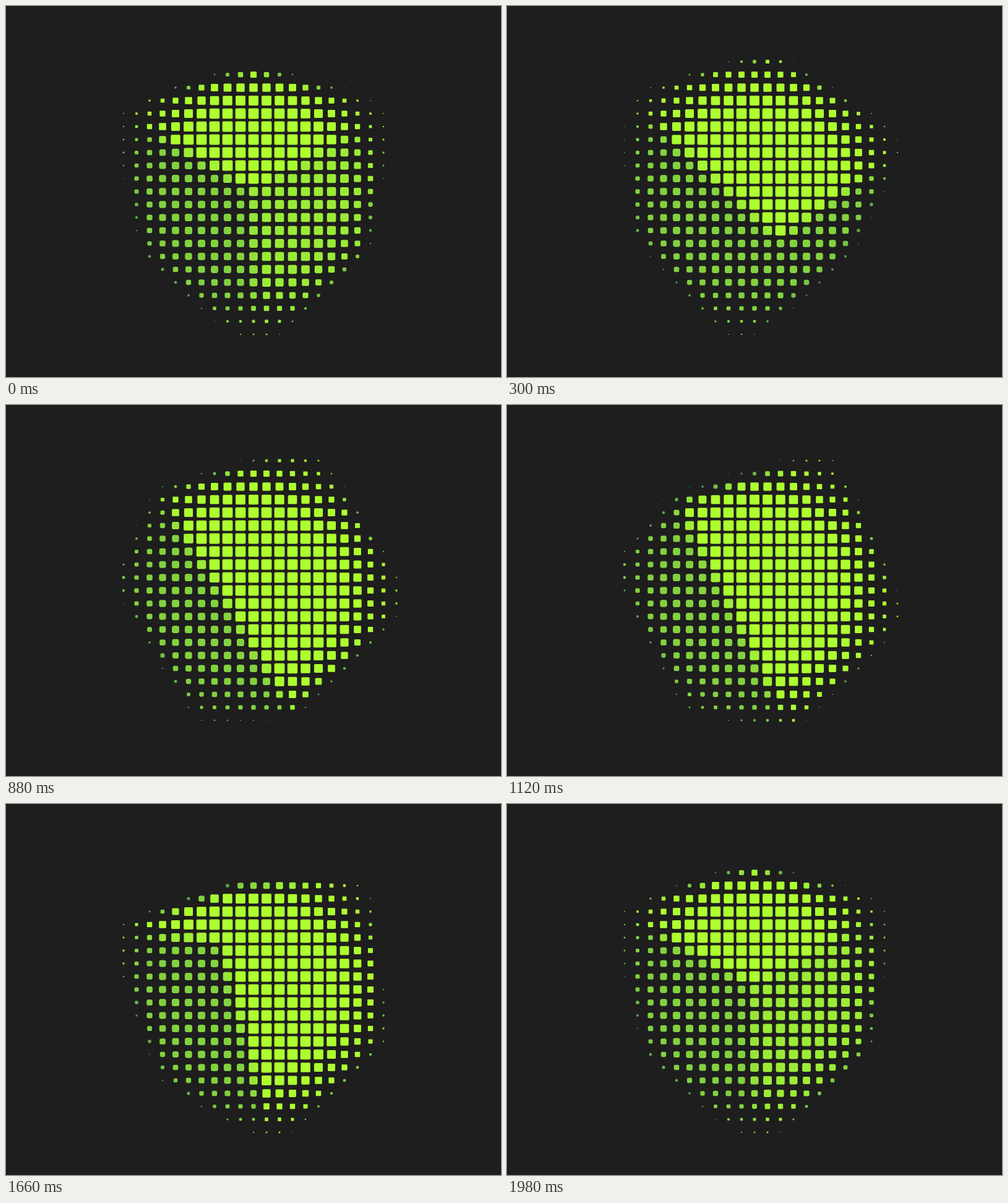
These frames come from a looping animation (800x600 px, 2 s). An HTML page with a canvas:

```html
<!DOCTYPE html>
<html lang="en">
<head>
<meta charset="utf-8">
<title>Halftone cube</title>
<style>
  html, body { margin: 0; width: 100%; height: 100%; overflow: hidden; background: #1e1e1e; }
  canvas { display: block; }
</style>
</head>
<body>
<canvas id="stage" width="800" height="600"></canvas>
<script>
const ctx = document.getElementById('stage').getContext('2d');
const LOOP = 2000, STEP = 20, COUNT = LOOP / STEP;
const PITCH = 21, DOT = 16.8, REACH = 247, IDLE_REACH = 232;
const CX = 400, CY = 300, FOCAL = 590, CAMERA = 4.24;
const FADE = Math.exp(-STEP / 60);
const SAMPLES = [-0.4, -0.2, 0, 0.2, 0.4];
const DARK = [20, 90, 106], LIME = [173, 255, 47];

const clamp = (v, a, b) => Math.min(b, Math.max(a, v));
const rad = deg => deg * Math.PI / 180;

// Dots shrink towards the rim.
function falloff(d) {
  const u = clamp((d - 128) / 142, 0, 1);
  return 1 - u * u * (3 - 2 * u);
}

const cells = [];
for (let j = -11; j <= 11; j++) {
  for (let i = -11; i <= 11; i++) {
    const d = Math.hypot(i, j) * PITCH;
    if (d < REACH) cells.push({ x: CX + i * PITCH, y: CY + j * PITCH, d, scale: falloff(d) });
  }
}

// Isometric view of a cube with half side 1, seen in perspective.
function project(deg, z) {
  const x = Math.SQRT2 * Math.cos(rad(deg)), y = Math.SQRT2 * Math.sin(rad(deg));
  const k = FOCAL / (CAMERA - (x + y + z) / Math.sqrt(3));
  return [
    CX + k * (x - z) / Math.SQRT2,
    CY - k * (2 * y - x - z) / Math.sqrt(6)
  ];
}

function turn(ms) {
  const p = 2 * Math.PI * ms / LOOP;
  return 90 * ms / LOOP + 1.7 * (1 - Math.cos(p)) + 1.5 * Math.sin(p);
}

function area(q) {
  return q.reduce((sum, p, i) => {
    const n = q[(i + 1) % q.length];
    return sum + p[0] * n[1] - n[0] * p[1];
  }, 0);
}

function visibleFaces(ms) {
  const a = turn(ms);
  const faces = [{ light: 0.52, quad: [45, 135, 225, 315].map(v => project(v - a, 1)) }];
  for (let k = -1; k <= 2; k++) {
    const phase = a + 90 * k, n = 90 - phase;
    faces.push({
      light: clamp(1 - (phase - 76) * 0.02, 0.52, 1),
      quad: [project(n - 45, 1), project(n - 45, -1), project(n + 45, -1), project(n + 45, 1)]
    });
  }
  return faces.filter(f => area(f.quad) < 0);
}

function inside(q, x, y) {
  for (let i = 0; i < 4; i++) {
    const a = q[i], b = q[(i + 1) % 4];
    if ((b[0] - a[0]) * (y - a[1]) - (b[1] - a[1]) * (x - a[0]) > 0) return false;
  }
  return true;
}

function sampleCell(faces, c) {
  let sum = 0;
  for (const v of SAMPLES) for (const u of SAMPLES) {
    const hit = faces.find(f => inside(f.quad, c.x + u * PITCH, c.y + v * PITCH));
    if (hit) sum += hit.light;
  }
  return sum / SAMPLES.length ** 2;
}

const lit = Array.from({ length: COUNT }, (_, n) => {
  const faces = visibleFaces(n * STEP);
  return cells.map(c => sampleCell(faces, c));
});

// Light comes at once and fades slowly; the second pass closes the loop.
const levels = [];
let level = cells.map(() => 0);
for (let n = 0; n < 2 * COUNT; n++) {
  level = level.map((v, i) => {
    const goal = lit[n % COUNT][i];
    return v > goal ? goal + (v - goal) * FADE : goal;
  });
  levels[n % COUNT] = level;
}

function drawDot(c, value) {
  const s = Math.sqrt(value);
  let size = DOT * s * c.scale;
  if (c.d <= IDLE_REACH) size = Math.max(size, 0.8);
  if (size < 0.3) return;
  const rgb = DARK.map((v, i) => Math.round(v + (LIME[i] - v) * s));
  ctx.fillStyle = `rgb(${rgb})`;
  ctx.beginPath();
  ctx.roundRect(c.x - size / 2, c.y - size / 2, size, size, size * Math.min(0.5, 0.12 + 0.64 * (1 - s)));
  ctx.fill();
}

const start = performance.now();
function draw() {
  const n = Math.floor((performance.now() - start) / STEP) % COUNT;
  ctx.fillStyle = '#1e1e1e';
  ctx.fillRect(0, 0, 800, 600);
  cells.forEach((c, i) => drawDot(c, levels[n][i]));
  requestAnimationFrame(draw);
}
draw();
</script>
</body>
</html>
```
